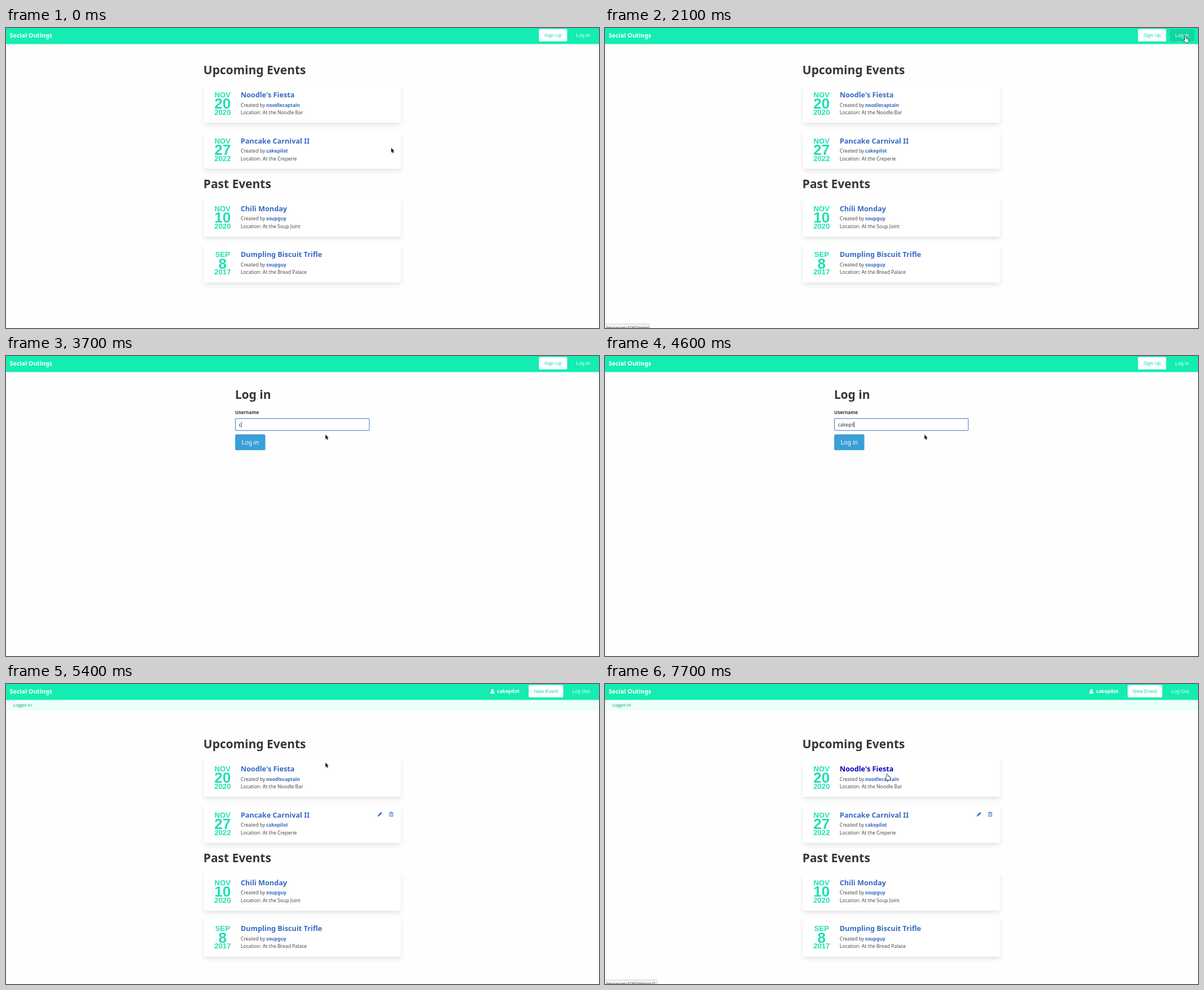
Recreate the animation shown at these times as an HTML page with a canvas. Size 1053x532 px, loop 8000 ms.

```html
<!DOCTYPE html>
<html lang="en">
<head>
<meta charset="utf-8">
<title>Events</title>
<style>
html, body { margin: 0; width: 100%; height: 100%; overflow: hidden; background: #fefefe; }
canvas { display: block; }
</style>
</head>
<body>
<canvas id="stage" width="1053" height="532"></canvas>
<script>
const ctx = document.getElementById('stage').getContext('2d');
const LOOP = 8000, STEP = 100;
const REM = 8.77;
const HUMANIST = '"Noto Sans", "Open Sans", sans-serif';
const GROTESK = '"Liberation Sans", Arial, sans-serif';
const MINT = '#14edb2', DATE = '#1fe0b1', LINK = '#366ac2', HOVER = '#0a05b8';
const DARK = '#363636', BODY = '#4a4a4a', PALE = '#e0fff7';
const USER = 'cakepilot';

const EVENTS = [
  { date: 'NOV 20 2020', title: "Noodle's Fiesta", by: 'noodlecaptain', place: 'Noodle Bar' },
  { date: 'NOV 27 2022', title: 'Pancake Carnival II', by: USER, place: 'Creperie' },
  { date: 'NOV 10 2020', title: 'Chili Monday', by: 'soupguy', place: 'Soup Joint' },
  { date: 'SEP 8 2017', title: 'Dumpling Biscuit Trifle', by: 'soupguy', place: 'Bread Palace' }
];
const CARD_PITCH = 81.8, PAST_GAP = 38.2, FLASH_SHIFT = 32;

// Page events in ms
const HOVER_LOGIN = 1400, SHOW_LOGIN = 2300, SUBMIT = 5200, LOGGED_IN = 5400;
const HOVER_AUTHOR = 7400, HOVER_TITLE = 7700;

const HOME = { x: 684, y: 212.5 };
const MOVES = [
  { from: 0, to: 200, x: 686, y: 213.5 },
  { from: 700, to: 900, x: 748, y: 181 },
  { from: 1000, to: HOVER_LOGIN, x: 1029, y: 17 },
  { from: 1500, to: 1700, x: 1031, y: 15.5 },
  { from: 2200, to: 2700, x: 598, y: 145.5 },
  { from: 2700, to: 2900, x: 567.3, y: 139.3 },
  { from: 6400, to: 6500, x: 515.5, y: 157.5 },
  { from: 6700, to: 7100, x: 529, y: 169 },
  { from: 7100, to: HOVER_TITLE, x: 501, y: 160 }
];

// Bursts of typing, one letter per step
const BURSTS = [
  { at: 3700, letters: 1 }, { at: 3900, letters: 3 }, { at: 4300, letters: 1 },
  { at: 4500, letters: 3 }, { at: 5100, letters: 1 }
];

const within = (t, from, to) => t >= from && t < to;
const clamp = (v, lo, hi) => Math.min(hi, Math.max(lo, v));
const smooth = k => k * k * (3 - 2 * k);

function text(str, x, y, size, color, { bold = false, face = HUMANIST, align = 'left' } = {}) {
  ctx.font = `${bold ? 'bold ' : ''}${size}px ${face}`;
  ctx.textAlign = align;
  ctx.fillStyle = color;
  ctx.fillText(str, x, y);
}

function box(x, y, w, h, r, color) {
  ctx.beginPath();
  ctx.roundRect(x, y, w, h, r);
  ctx.fillStyle = color;
  ctx.fill();
}

function heading(str, x, y) {
  text(str, x, y, 21, DARK, { bold: true });
}

function navButton(label, x, w, back, color) {
  if (back) box(x, 1.8, w, 22, 2, back);
  text(label, x + w / 2, 16.2, REM, color, { face: GROTESK, align: 'center' });
}

function navbar(loggedIn, hoverLogin) {
  ctx.fillStyle = MINT;
  ctx.fillRect(0, 0, 1053, 28.5);
  text('Social Outings', 6.5, 17.3, 10.6, '#fff', { bold: true });
  if (!loggedIn) {
    navButton('Sign Up', 946.4, 50, '#fff', '#19dcb0');
    navButton('Log In', 1003, 43.5, hoverLogin && '#12d5a0', PALE);
    return;
  }
  box(861.6, 9, 4.2, 5, 2.1, '#fff');
  box(860.2, 13, 7, 4.2, [2, 2, 1, 1], '#fff');
  text(USER, 872, 16.2, 8.6, '#fff', { bold: true });
  navButton('New Event', 928, 61.5, '#fff', '#19dcb0');
  navButton('Log Out', 996, 50, null, PALE);
  ctx.fillStyle = '#ebfefa';
  ctx.fillRect(0, 28.5, 1053, 18.5);
  text('Logged in!', 13, 40.4, 7.1, '#1ba586', { face: GROTESK });
}

function editIcons(y) {
  ctx.strokeStyle = LINK;
  ctx.lineWidth = 2.8;
  ctx.beginPath();
  ctx.moveTo(667, y - 3);
  ctx.lineTo(662, y + 2);
  ctx.stroke();
  ctx.lineWidth = 1.6;
  ctx.beginPath();
  ctx.moveTo(662, y + 2);
  ctx.lineTo(660.4, y + 3.6);
  ctx.stroke();

  ctx.lineWidth = 0.8;
  ctx.strokeRect(681.4, y - 2.4, 5.4, 6.2);
  ctx.fillStyle = LINK;
  ctx.fillRect(680.3, y - 3.2, 7.6, 0.8);
  ctx.fillRect(682.6, y - 4.2, 3, 1);
  for (let i = 0; i < 3; i++) ctx.fillRect(682.7 + i * 1.1, y - 1, 0.5, 3.6);
}

function eventCard({ date, title, by, place }, top, titleColor, authorColor) {
  ctx.save();
  ctx.translate(0, top);
  ctx.save();
  ctx.shadowColor = 'rgba(10,10,10,0.11)';
  ctx.shadowBlur = REM;
  ctx.shadowOffsetY = REM / 2;
  box(352, 101, 349, 66, 3, '#fff');
  ctx.restore();
  box(350.5, 99.5, 351.5, 69, 3.3, 'rgba(10,10,10,0.02)');
  box(351, 100, 350.5, 68, 3, '#fff');

  const [month, day, year] = date.split(' ');
  const dateStyle = { bold: true, face: GROTESK, align: 'center' };
  text(month, 384.6, 122.8, REM * 1.5, DATE, dateStyle);
  text(day, 384.6, 143.4, REM * 3, DATE, dateStyle);
  text(year, 384.6, 153.8, REM * 1.5, DATE, dateStyle);

  text(title, 416.7, 122.8, 12.7, titleColor, { bold: true });
  text('Created by', 416.7, 139.6, 8.6, BODY);
  text(by, 462, 139.6, 8.4, authorColor, { bold: true });
  text('Location: At the ' + place, 416.7, 152.8, 8.6, BODY);
  ctx.restore();
}

function eventsPage(t) {
  const loggedIn = t >= LOGGED_IN;
  const shift = loggedIn ? FLASH_SHIFT : 0;
  navbar(loggedIn, within(t, HOVER_LOGIN, SHOW_LOGIN));
  heading('Upcoming Events', 350.5, 82.3 + shift);
  heading('Past Events', 350.5, 284 + shift);
  EVENTS.forEach((event, i) => {
    const top = shift + i * CARD_PITCH + (i > 1 ? PAST_GAP : 0);
    const titleHover = i === 0 && t >= HOVER_TITLE;
    const authorHover = i === 0 && within(t, HOVER_AUTHOR, HOVER_TITLE);
    eventCard(event, top, titleHover ? HOVER : LINK, authorHover ? HOVER : LINK);
  });
  if (loggedIn) editIcons(231);
}

function typedLetters(t) {
  return BURSTS.reduce((sum, { at, letters }) =>
    sum + clamp(Math.floor((t - at) / STEP) + 1, 0, letters), 0);
}

function loginPage(t) {
  navbar(false, false);
  heading('Log in', 406.7, 75.5);
  text('Username', 407, 102.8, 8.2, DARK, { bold: true });

  box(406.5, 110, 239.5, 23, 2.5, '#c3d5ee');
  box(407, 110.6, 238.5, 21.8, 2, '#5c88c5');
  box(408, 111.6, 236.5, 19.8, 1.2, '#fff');
  const typed = USER.slice(0, typedLetters(t));
  text(typed, 413.5, 124.6, REM, DARK);
  if (!within(t, 3300, 3700)) {
    ctx.fillRect(413.4 + ctx.measureText(typed).width, 116.5, 0.8, 10.5);
  }

  box(407, 139, 53.5, 28, 2, t >= SUBMIT ? '#9ccfeb' : '#3a9fd8');
  text('Log in', 433.7, 157.3, 10.6, '#fff', { align: 'center' });
}

function statusBar(label, width) {
  box(-2, 524.5, width + 2, 12, [0, 2.5, 0, 0], '#c4c4c4');
  box(-2, 525.3, width + 1.2, 12, [0, 2, 0, 0], '#f3f3f3');
  text(label, 1.5, 533.8, 7.7, '#444');
}

function pointerAt(t) {
  return MOVES.reduce((pos, { from, to, x, y }) => {
    const k = smooth(clamp((t - from) / (to - from), 0, 1));
    return { x: pos.x + (x - pos.x) * k, y: pos.y + (y - pos.y) * k };
  }, HOME);
}

function outlined(path, fill, stroke, width) {
  ctx.lineWidth = width;
  ctx.strokeStyle = stroke;
  ctx.stroke(path);
  ctx.fillStyle = fill;
  ctx.fill(path);
}

function pointer(t) {
  const hand = within(t, HOVER_LOGIN, SHOW_LOGIN) || t >= HOVER_AUTHOR;
  const { x, y } = pointerAt(t);
  ctx.save();
  ctx.translate(x, y);
  ctx.lineJoin = 'round';
  if (hand) {
    const path = new Path2D();
    path.roundRect(-1, 0, 2, 8, 1);
    path.roundRect(-1, 4, 6, 6.2, 1.6);
    path.roundRect(-2.8, 5.4, 3.6, 2.6, 1.2);
    outlined(path, '#fff', '#222', 1.5);
  } else {
    const path = new Path2D('M0 0V8.4L1.9 6.7L3.2 9.7L4.5 9.1L3.3 6.2L5.7 6Z');
    outlined(path, '#1c1c1c', '#fff', 0.9);
  }
  ctx.restore();
}

function draw(now) {
  const t = Math.floor((now % LOOP) / STEP) * STEP;
  ctx.fillStyle = '#fefefe';
  ctx.fillRect(0, 0, 1053, 532);
  if (within(t, SHOW_LOGIN, LOGGED_IN)) loginPage(t);
  else eventsPage(t);

  if (within(t, 1600, 2900)) statusBar('devserver:4180/enter', 79.5);
  if (within(t, 5300, LOGGED_IN)) statusBar('devserver...', 178);
  if (t >= HOVER_TITLE) statusBar('devserver:4180/things/7', 93.5);
  pointer(t);
}

let start;
function tick(now) {
  start ??= now;
  draw(now - start);
  requestAnimationFrame(tick);
}
draw(0);
requestAnimationFrame(tick);
</script>
</body>
</html>
```
